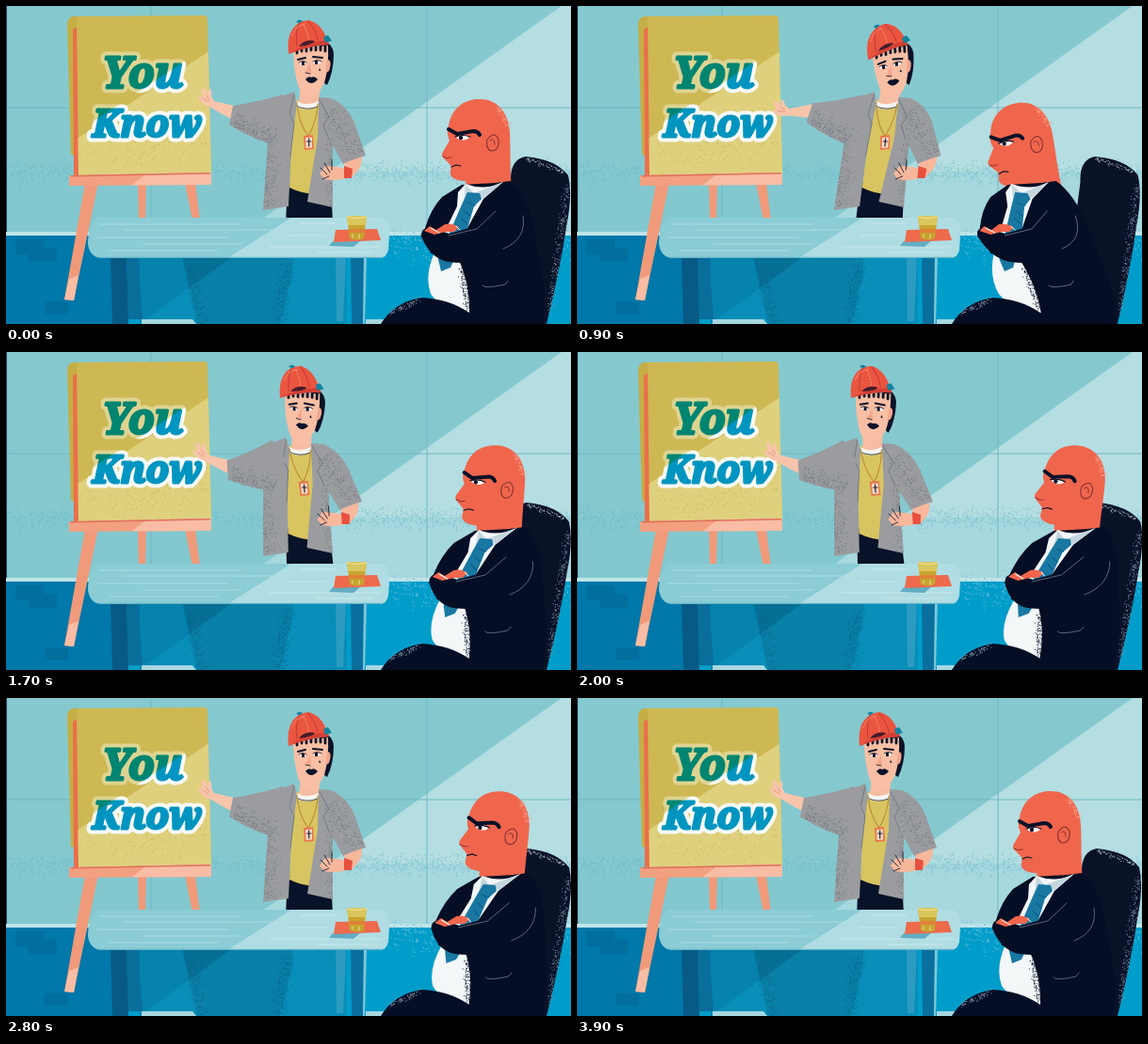
An HTML page for the animation above (4200 ms loop, 600 by 338 pixels).

```html
<!DOCTYPE html>
<html lang="en">
<head>
<meta charset="utf-8">
<title>You Know</title>
<style>
html, body { margin: 0; width: 100%; height: 100%; overflow: hidden; background: #85c9cf; }
svg { display: block; width: 100vw; height: 100vh; }
.sign { font-family: "Noto Serif", "Liberation Serif", serif; font-weight: 900; font-style: italic; text-anchor: middle; stroke-linejoin: round; }
.line { fill: none; stroke-linecap: round; stroke-linejoin: round; }
</style>
</head>
<body>
<svg id="stage" viewBox="0 0 600 338" preserveAspectRatio="none">
<defs>
  <linearGradient id="ink" gradientUnits="userSpaceOnUse" x1="109" y1="56" x2="175" y2="156">
    <stop offset=".38" stop-color="#008571"/><stop offset=".4" stop-color="#0095c0"/>
  </linearGradient>
  <linearGradient id="rim" gradientUnits="userSpaceOnUse" x1="109" y1="56" x2="175" y2="156">
    <stop offset=".38" stop-color="#ded491"/><stop offset=".4" stop-color="#f7faf6"/>
  </linearGradient>
  <clipPath id="paper"><path d="M75 13Q75 11 78 11L211 10Q214 10 214 15L218 177L77 180Z"/></clipPath>
  <clipPath id="top"><path d="M97 225H398Q408 226 407 240L406 258Q405 268 395 268H101Q89 267 87 253Q87 233 97 225Z"/></clipPath>
  <clipPath id="coat"><path d="M306 91L290 97Q276 112 278 145L273 217L300 213L303 150L309 103ZM332 97L345 98Q362 105 370 124L382 159L358 168L347 148L347 214L320 208L331 140Z"/></clipPath>
  <clipPath id="sleeveClip"><path d="M294 94Q268 102 241 106L237 126Q255 138 281 147L302 118Z"/></clipPath>
</defs>

<g id="room">
  <path fill="#85c9cf" d="M0 0H600V242H0Z"/>
  <path fill="#fff" opacity=".38" d="M590 0H600V242H250Z"/>
  <path fill="#7cc4cf" opacity=".25" d="M0 176H600V242H0Z"/>
  <g id="wallSpray" opacity=".5"></g>
  <path class="line" stroke="#6fb7c2" stroke-width="1" d="M0 108H600M154 0V242M447 0V242"/>
  <path fill="#0078a9" d="M0 240H600V338H0Z"/>
  <path fill="#009dca" d="M253 240H600V338H120Z"/>
  <path fill="#bfe5e9" d="M0 240H600V244H0Z"/>
  <path fill="#006c9b" opacity=".75" d="M10 248H40V257H54V272H24V264H10ZM41 314H66V327H41Z"/>
  <g id="floorSpray"></g>
  <path fill="#21405a" d="M0 0H1V240H0Z"/>
</g>

<g id="easel">
  <path fill="#f09a7a" d="M84 188H98L72 313L62 312ZM140 188H149L148 228H141ZM190 188H201L206 228H198Z"/>
  <path fill="#f8bda4" d="M67 290L77 286L72 313L62 312Z"/>
  <path fill="#c4ae45" d="M65 20Q65 11 73 11H80V160L69 158Z"/>
  <path fill="#ea6f4b" d="M71 25L76 22L78 181L72 181Z"/>
  <g clip-path="url(#paper)">
    <path fill="#cdb854" d="M60 0H230V190H60Z"/>
    <path fill="#dfd07e" d="M225 42V190H60V151Z"/>
    <g id="paperSpray"></g>
  </g>
  <path fill="#f2a080" d="M67 180L218 177V190L67 191Z"/>
  <path fill="#f8bda4" d="M150 178L218 177V190L133 190.5Z"/>
  <path fill="#e0705a" d="M69 180L217 177V178.5L69 181.5Z"/>
  <g class="sign">
    <g fill="url(#rim)" stroke="url(#rim)" stroke-width="11">
      <text x="145" y="87" font-size="45">You</text><text x="150" y="139" font-size="40">Know</text>
    </g>
    <g fill="url(#ink)" stroke="url(#ink)" stroke-width="3">
      <text x="145" y="87" font-size="45">You</text><text x="150" y="139" font-size="40">Know</text>
    </g>
  </g>
</g>

<g id="speaker">
  <path fill="#081228" d="M299 188L345 186L347 232H297Z"/>
  <path fill="#d8c460" d="M305 100H335L338 150L330 200Q315 200 301 193Z"/>
  <path fill="#f7bda2" d="M313 82L334 80L332 104Q320 110 311 103Z"/>
  <path fill="#f4f6f4" d="M307 100Q319 108 332 101L331 107Q318 113 306 106Z"/>
  <path class="line" stroke="#1a2036" stroke-width=".8" d="M308 106Q319 112 331 107"/>
  <g clip-path="url(#coat)">
    <path fill="#9a9c9f" d="M260 80H390V225H260Z"/>
    <g id="coatSpray"></g>
  </g>
  <path class="line" stroke="#747a82" d="M306 94L301 116L306 125L302 160M333 100L343 118L337 126L343 142"/>
  <path fill="#f7b79b" d="M359 167L378 160Q379 172 368 181Q352 187 338 184L333 178L339 170L352 171L361 173Z"/>
  <path class="line" stroke="#1a2036" stroke-width=".9" d="M334 172L341 179M338 167L344 177M346 164V174M336 184L343 181"/>
  <path fill="#e8503e" d="M359 170L368 173L367 183L359 183Z"/>
  <path class="line" stroke="#b98c37" stroke-width="1.2" stroke-dasharray="1.5 1" d="M309 103Q311 125 321 138Q330 122 331 104"/>
  <path fill="#e9774f" d="M316 138L326 137L327 152L317 153Z"/>
  <path fill="#f8d9c3" d="M318 140L325 139.5V150.5L318.5 151Z"/>
  <path class="line" stroke="#1a2036" stroke-width="1.2" d="M321.7 141V149M319.6 144H324"/>
  <g id="arm">
    <g id="hand" fill="#f8c5ab">
      <path d="M246 107L243 122Q229 115 216 107Q207 104 205 99L204 95Q207 95 209 98L207 89Q209 86 212 89L214 94L216 88Q219 88 218 96L221 101Z"/>
      <path class="line" stroke="#dc8a70" stroke-width=".7" d="M209 98L215 102M213 95L216 100"/>
    </g>
    <g clip-path="url(#sleeveClip)">
      <path fill="#9a9c9f" d="M230 85H310V155H230Z"/>
      <g id="sleeveSpray"></g>
    </g>
  </g>
  <g id="face">
    <path fill="#0b1228" d="M334 36Q347 39 348 51Q348 70 341 84L335 80Z"/>
    <path fill="#f8bfa4" d="M305 46L342 42Q343 65 338 82Q330 97 323 98Q314 96 310 84Q305 66 305 46Z"/>
    <path fill="#f3a68d" d="M341 57Q347 57 343 69L339 72ZM323 60L318 71L324 72Z"/>
    <path class="line" stroke="#0b1228" stroke-width="2" d="M310 57L318 55M326 54L336 55"/>
    <path fill="#fff" d="M311 61Q315 58 319 61Q315 65 311 61ZM326 60Q331 57 335 60Q330 64 326 60Z"/>
    <path fill="#0b1228" d="M314 59h3v4h-3zM328 58h3v4h-3zM333 66l1.5 3l-2.5-.5zM318 78Q321 74 324 76Q328 74 331 78Q326 84 321 81Z"/>
    <path class="line" stroke="#0b1228" stroke-width=".8" d="M311 60Q315 57 319 60M326 59Q331 56 335 59M318 71L323 72"/>
    <path class="line" stroke="#0b1228" stroke-width="2.8" d="M309 44V50M314 44V48M319 43V48M324 42V47M329 41V47M334 40V47M339 39V48"/>
    <path fill="#ea5540" d="M300 51Q298 34 304 25Q310 16 321 15Q335 18 341 36L343 41Q322 42 300 51Z"/>
    <path fill="#d43f35" d="M300 51Q319 38 342 36L343 41Q321 42 300 51Z"/>
    <path fill="#431c2b" d="M311 43Q317 35 328 37Q326 41 311 43Z"/>
    <path class="line" stroke="#c23a34" stroke-width="1" d="M311 18Q307 31 309 43M321 16Q329 26 331 36"/>
    <path class="line" stroke="#f89276" stroke-width="1.1" stroke-dasharray="1 2" d="M304 31Q308 21 317 19M316 20Q321 29 321 35"/>
    <path fill="#14839d" d="M337 33L342 31L346 37L339 39ZM308 17Q311 13 315 16L312 18Z"/>
  </g>
</g>

<g id="table">
  <path fill="#0583ad" d="M142 268H362V338H142Z"/>
  <path fill="#066f96" d="M187 266H305Q302 300 291 338H203Z"/>
  <path fill="#12a5d0" opacity=".3" d="M238 268H362V338H142Z"/>
  <g id="panelSpray"></g>
  <path fill="#075a86" d="M111 266H128L130 338H113Z"/>
  <path fill="#0a6e9b" d="M128 266H140L145 333H130Z"/>
  <path fill="#2c9bc2" d="M350 268H361L358 335H351Z"/>
  <path fill="#0a6f9c" d="M366 266H380L379 338H367Z"/>
  <path fill="#7fc6da" d="M380 266H383L381 338H379Z"/>
  <path fill="#a6d7e1" d="M144 333H198L202 338H144ZM382 333H402V338H382Z"/>
  <g clip-path="url(#top)">
    <path fill="#8bccd5" d="M80 220H415V270H80Z"/>
    <path fill="#b0dde3" d="M311 220H415V270H232Z"/>
    <path class="line" stroke="#b4dee3" stroke-width=".8" d="M100 232H250M125 238H286M97 246H235M145 253H250M110 260H225"/>
    <path class="line" stroke="#cfeaed" stroke-width=".8" d="M312 231H350M300 244H340M280 256H398M330 262H390"/>
    <path class="line" stroke="#62b2c8" stroke-width="1.4" d="M92 267.5H402"/>
  </g>
  <path fill="#62adc3" d="M347 250L377 249L369 256L343 255Z"/>
  <path fill="#ed6a4c" d="M350 238L394 237L398 249L348 251Z"/>
  <path fill="#c7a42f" d="M362 223H383L380 247Q372 250 365 247Z"/>
  <path fill="#d9c65c" d="M362 223H383L382 233H363Z"/>
  <path fill="#df8238" d="M364 237H381L380.5 241H364.5Z"/>
  <path class="line" stroke="#eee3a0" d="M362 224Q372 227 383 224M368 243V246M375 243V247"/>
</g>

<g id="chair">
  <path fill="#0a1228" d="M536 187Q535 163 552 160Q584 163 597 180Q602 200 595 235Q588 282 574 338H515Z"/>
  <g id="chairSpray"></g>
</g>

<g id="bossHead">
  <path fill="#f0664d" d="M470 127C474 106 489 99 503 99C523 99 534 115 535 135C536 155 535 173 537 196Q512 206 489 194L488 186Q477 186 473 181C470 177 474 173 472 169L464 161Q462 158 464 155L471 143Q467 135 470 127Z"/>
  <g id="headSpray"></g>
  <path class="line" stroke="#0b1228" stroke-width="4" d="M470 131L479 136L496 133Q501 133 503 137"/>
  <path fill="#fff" d="M478 140Q486 134 492 140Q485 145 478 140Z"/>
  <path class="line" stroke="#0b1228" stroke-width="1.2" d="M477 139Q485 136 493 139M473 171L478 169L483 170"/>
  <circle cx="483" cy="140" r="2.2" fill="#0b1228"/>
  <path class="line" stroke="#8f2f2d" d="M464 160Q468 163 473 161"/>
  <path fill="#f0664d" stroke="#82302f" stroke-width="1.1" d="M511 142Q519 132 523 142Q524 154 515 154Q509 151 511 142Z"/>
  <path class="line" stroke="#82302f" stroke-width=".9" d="M514 143Q519 139 519 147"/>
</g>

<g id="boss">
  <path fill="#050e24" d="M484 190L463 203Q451 216 445 236L451 263L466 265Q482 298 490 338H570L572 300L560 235Q553 200 536 186L520 188Z"/>
  <path fill="#f3f7f8" d="M488 189Q508 197 528 187L507 205L485 245L477 262Q493 292 492 327Q461 321 451 306Q444 287 455 262L479 213L480 198Z"/>
  <path fill="#c3d6de" d="M488 190L497 199L528 187L507 204L499 201L486 210Z"/>
  <path fill="#1878a2" d="M490 198L503 199L505 205L497 213L487 246L472 278L462 282L459 269L484 211Z"/>
  <path class="line" stroke="#0a5f88" stroke-width="1.1" d="M490 209L498 212M487 218L493 223M484 226L490 232"/>
  <g id="shirtSpray"></g>
  <path fill="#050e24" d="M512 202L536 192Q550 205 553 243Q549 262 520 269Q492 275 470 272Q451 269 441 245Q440 237 449 235L471 242L499 234Z"/>
  <path fill="#f0664d" d="M444 239L450 234L457 238L466 232Q474 230 481 235L476 240L467 240L455 243Z"/>
  <path class="line" stroke="#fff" stroke-width="1" d="M451 236L460 241M478 234L482 238"/>
  <path class="line" stroke="#6e7a90" stroke-width=".8" d="M470 244L500 237L520 218M506 297Q508 301 530 296L533 292M549 223Q553 248 528 258"/>
</g>
<g id="legs">
  <path fill="#050e24" d="M398 338Q412 315 441 310Q470 311 492 326L572 318L570 338Z"/>
  <g id="legSpray"></g>
</g>
</svg>
<script>
const $ = id => document.getElementById(id);
let seed = 29;
const rnd = () => (seed = (seed * 16807) % 2147483647) / 2147483647;

// Scatter grain along a segment, thinning out to the given spread.
function spray(id, x1, y1, x2, y2, spread, count, color, size = 0.9) {
  const len = Math.hypot(x2 - x1, y2 - y1);
  let d = "";
  for (let i = 0; i < count; i++) {
    const u = rnd(), off = (rnd() + rnd() + rnd() - 1.5) * spread;
    const x = x1 + (x2 - x1) * u + (y1 - y2) / len * off;
    const y = y1 + (y2 - y1) * u + (x2 - x1) / len * off;
    d += `M${x.toFixed(1)} ${y.toFixed(1)}h${size}v${size}h-${size}z`;
  }
  $(id).insertAdjacentHTML("beforeend", `<path d="${d}" fill="${color}"/>`);
}

spray("wallSpray", 0, 177, 600, 177, 11, 1700, "#5fb2c4", 1.2);
spray("floorSpray", 405, 252, 600, 252, 16, 420, "#6cbdd6", 1.1);
spray("paperSpray", 80, 160, 215, 130, 30, 150, "#d2c06a", 1.6);
spray("coatSpray", 276, 120, 277, 214, 12, 330, "#71777e");
spray("coatSpray", 344, 110, 374, 157, 12, 190, "#71777e");
spray("coatSpray", 344, 140, 344, 213, 5, 100, "#71777e");
spray("sleeveSpray", 240, 124, 286, 144, 12, 260, "#71777e");
spray("panelSpray", 299, 270, 289, 336, 9, 230, "#05658c");
spray("panelSpray", 196, 276, 209, 336, 8, 130, "#0c5f84");
spray("chairSpray", 596, 190, 576, 328, 4, 210, "#7e91a5");
spray("chairSpray", 552, 162, 592, 176, 2, 70, "#a5b5c2");
spray("headSpray", 521, 106, 533, 127, 3, 55, "#f9a38a");
spray("shirtSpray", 483, 278, 491, 324, 4, 110, "#050e24");
spray("legSpray", 406, 326, 441, 311, 3, 70, "#8b9bb0");

// Each track is a list of [ms, value] poses joined by smooth moves.
const tracks = {
  lean: [[0, 0], [500, .08], [1000, .08], [1600, -.07], [2200, -.07], [2800, 0]],
  tilt: [[0, 0], [500, -9], [1000, -9], [1600, 6], [2200, 6], [2800, 0]],
  arm: [[0, 0], [500, 3], [1000, 3], [1600, -11], [2200, -11], [2800, 0]],
  wrist: [[0, 0], [500, -28], [1000, -28], [1600, 11], [2200, 11], [2800, 0]],
  sway: [[0, 0], [500, 0], [900, -28], [1150, -28], [1900, 24], [2800, 19], [3000, 19], [3900, 0]],
  nod: [[0, 0], [500, 0], [900, -8], [1150, -8], [1900, 8], [2800, 7], [3000, 7], [3900, 0]]
};

function at(name, t) {
  const keys = tracks[name];
  const i = keys.findIndex(k => k[0] > t);
  if (i < 0) return keys[keys.length - 1][1];
  const [t0, a] = keys[i - 1], [t1, b] = keys[i];
  const u = (t - t0) / (t1 - t0);
  return a + (b - a) * u * u * (3 - 2 * u);
}

const pose = (id, value) => $(id).setAttribute("transform", value);
const shear = (k, base) => `matrix(1 0 ${-k} 1 ${k * base} 0)`;

function draw(ms) {
  const t = Math.min(3900, Math.floor(ms % 4200 / 100) * 100);
  const tilt = at("tilt", t), sway = at("sway", t);
  pose("speaker", shear(at("lean", t), 215));
  pose("arm", `rotate(${at("arm", t)} 290 108)`);
  pose("hand", `rotate(${at("wrist", t)} 243 114)`);
  pose("face", `translate(0 ${Math.max(0, -tilt) * .3}) rotate(${tilt} 323 74)`);
  pose("bossHead", `translate(${sway} ${Math.max(0, -sway) * .13}) rotate(${at("nod", t)} 502 150)`);
  pose("boss", shear(sway / 140, 322));
  pose("chair", `rotate(${sway * .02} 545 338)`);
}

function tick() {
  draw(performance.now());
  requestAnimationFrame(tick);
}
tick();
</script>
</body>
</html>
```
